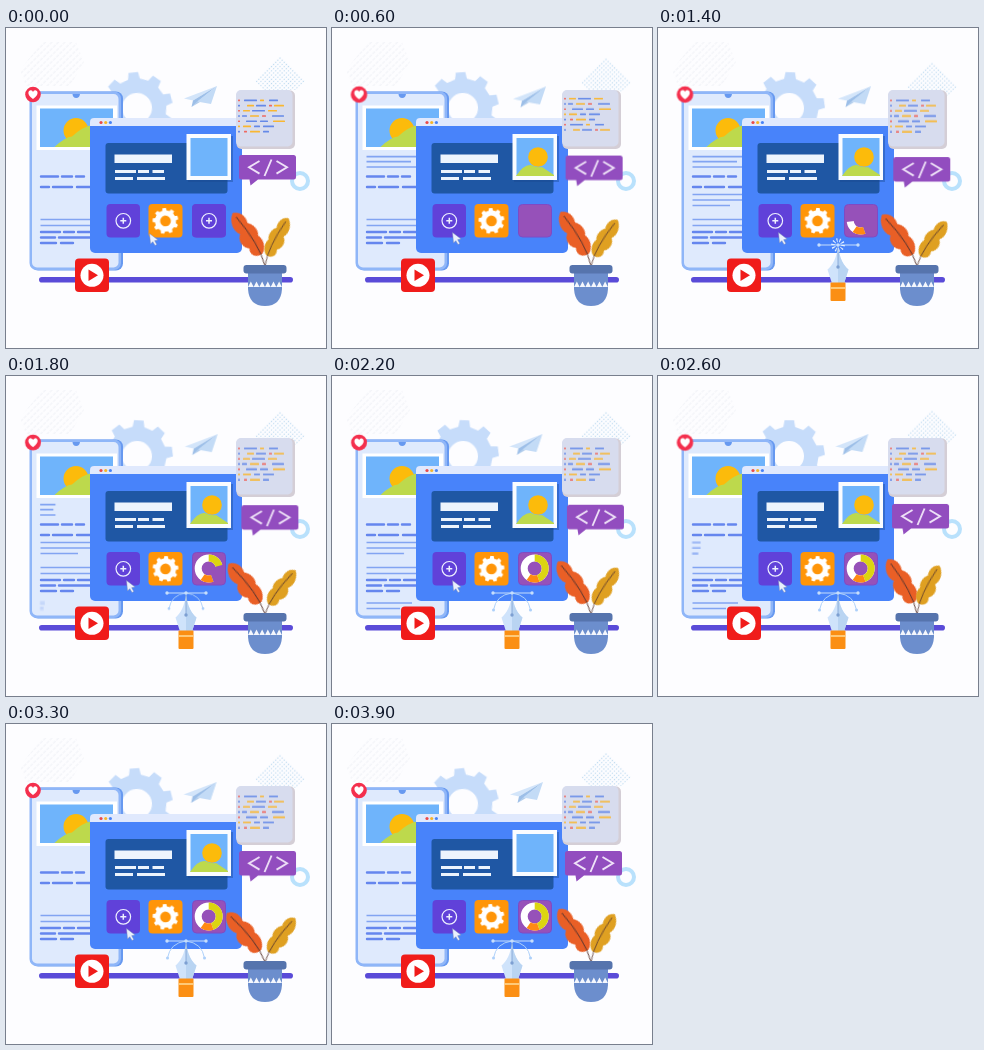
An HTML page that plays this animation: 320x320 px, repeating every 4 s.

```html
<!DOCTYPE html>
<html lang="en">
<head>
<meta charset="utf-8">
<title>App design</title>
<style>
html, body { margin: 0; width: 100%; height: 100%; overflow: hidden; background: #fdfdff; }
svg { display: block; width: 100vw; height: 100vh; }
.a { animation: 4s linear infinite; }
.ease { animation-timing-function: ease-in-out; }

.rock { animation-name: rock; }
@keyframes rock { 0%, 100% { transform: rotate(-6deg); } 45% { transform: rotate(3deg); } }
.dots { animation-name: dots; }
@keyframes dots { 50% { transform: translateY(7px); } }
.bubble { animation-name: bubble; }
@keyframes bubble { 42% { transform: translate(2.4px, 2.2px); } 85%, 100% { transform: none; } }
.plane { animation-name: plane; }
@keyframes plane { 15% { transform: translate(3px, .4px); } 35% { transform: translate(2px, .2px); } 55%, 70% { transform: translate(-.6px, 0); } }
.heart { transform-origin: 27px 66.5px; animation-name: beat; }
@keyframes beat { 12%, 37%, 62% { transform: scale(1.06); } 25%, 50%, 75% { transform: none; } }

.leafL { animation-name: leafL; }
@keyframes leafL {
  0%, 100% { transform: rotate(-29.5deg); }
  15% { transform: rotate(-27.5deg); }
  45% { transform: rotate(-34deg); }
  66% { transform: rotate(-26.5deg); }
  82% { transform: rotate(-36deg); }
}
.leafR { animation-name: leafR; }
@keyframes leafR {
  0%, 100% { transform: rotate(24deg); }
  15% { transform: rotate(28deg); }
  45% { transform: rotate(33deg); }
  66% { transform: rotate(23deg); }
  82% { transform: rotate(32.5deg); }
}

.ln { transform-origin: 34px 0; }
.ln1 { animation-name: ln1; }
@keyframes ln1 { 0%, 4% { transform: scaleX(0); } 13%, 38% { transform: none; } 48%, 100% { transform: scaleX(0); } }
.ln2 { animation-name: ln2; }
@keyframes ln2 { 0%, 20% { transform: scaleX(0); } 33%, 55% { transform: none; } 67%, 100% { transform: scaleX(0); } }
.ln3 { animation-name: ln3; }
@keyframes ln3 { 0%, 44% { transform: scaleX(0); } 54%, 68% { transform: none; } 78%, 100% { transform: scaleX(0); } }
.code { animation-name: code; }
@keyframes code { 0%, 5% { transform: none; } 30%, 100% { transform: translateY(-36.4px); } }

.hill { animation-name: hill; }
@keyframes hill { 0%, 3% { transform: translateY(42px); } 13%, 86% { transform: none; } 95%, 100% { transform: translateY(42px); } }
.cursor { animation-name: cursor; }
@keyframes cursor { 0% { transform: translate(23px, 1px); } 12%, 100% { transform: none; } }
.plus { animation-name: plus; }
@keyframes plus { 0%, 3% { opacity: 1; } 11%, 100% { opacity: 0; } }
.donut { animation-name: donut; }
@keyframes donut { 0%, 29% { stroke-dashoffset: 100; } 35% { stroke-dashoffset: 71; } 50%, 100% { stroke-dashoffset: 0; } }
.pen { transform-origin: 180px 273px; animation-name: pen; }
@keyframes pen { 0%, 18% { transform: scale(0); } 30%, 100% { transform: none; } }
.tip { transform-origin: 180px 217px; }
.spark { animation-name: spark; }
@keyframes spark { 0%, 30% { transform: scale(0); opacity: 1; } 35% { transform: none; opacity: 1; } 43%, 100% { transform: scale(1.2); opacity: 0; } }
.bar { animation-name: bar; }
@keyframes bar { 0%, 29% { transform: scale(0); } 35%, 100% { transform: none; } }
.arc { animation-name: arc; }
@keyframes arc { 0%, 37% { transform: scale(0); } 47%, 100% { transform: none; } }
</style>
</head>
<body>
<svg viewBox="0 0 320 320" xmlns="http://www.w3.org/2000/svg">
<defs>
  <pattern id="grid" width="3" height="3" patternUnits="userSpaceOnUse" patternTransform="translate(274 28) rotate(45)"><circle cx="1.5" cy="1.5" r=".7" fill="#b9d8ef"/></pattern>
  <pattern id="hatch" width="4.6" height="4.6" patternUnits="userSpaceOnUse" patternTransform="rotate(45)"><path d="M1 0V3.4" stroke="#f0f1f6" stroke-width="1"/></pattern>
  <path id="gear" fill="currentColor" fill-rule="evenodd"/>
  <g id="plus" fill="none" stroke="#eef0ff" stroke-width="1.2">
    <circle r="7.3"/><path d="M-3 0H3M0-3V3" stroke-width="1.5"/>
  </g>
  <g id="leaf">
    <path d="M4 -12C-4 -11 -8 -17 -5 -23C-11 -27 -11 -36 -6 -40C-11 -46 -9 -57 -2 -62C5 -60 8 -53 6 -46C11 -42 12 -34 9 -30C12 -24 10 -16 4 -12Z" fill="currentColor"/>
    <path d="M0 0Q6 -22 -1 -57" fill="none" stroke="#59362f" stroke-width=".9"/>
  </g>
  <clipPath id="phoneClip"><path d="M34 80.500H107V119H34Z"/></clipPath>
  <clipPath id="photoClip"><path d="M184.500 110H221.500V148H184.500Z"/></clipPath>
  <clipPath id="codeClip"><path d="M230 69.500H286V105.500H230Z"/></clipPath>
  <mask id="sweep" maskUnits="userSpaceOnUse" x="186" y="176" width="34" height="34">
    <circle class="a donut" cx="202.700" cy="192.500" r="10.500" fill="none" stroke="#fff" stroke-width="8.500" pathLength="100" stroke-dasharray="100 101" transform="rotate(70 202.700 192.500)"/>
  </mask>
</defs>

<rect width="320" height="320" fill="#fdfdff"/>
<path d="M14 42L36 14H70L78 34L64 58H20Z" fill="url(#hatch)"/>
<g class="a ease dots"><path d="M274 28L299 53L290 62H258L249 53Z" fill="url(#grid)"/></g>
<g transform="translate(131 80)"><use class="a ease rock" href="#gear" color="#c6dcfa"/></g>
<g class="a ease plane">
  <path d="M211 58L178 70.500L187 72.500Z" fill="#d3e5fa"/>
  <path d="M211 58L187 72.500L185.500 79Z" fill="#9dbfe8"/>
  <path d="M211 58L191 73.500L205 76Z" fill="#c3dbf6"/>
  <path d="M185.500 79L191 73.500L194 74Z" fill="#b2cdec"/>
</g>

<rect x="33" y="249" width="254" height="5.600" rx="2.800" fill="#5a4bd8"/>

<!-- phone -->
<rect x="25" y="63.500" width="92" height="179" rx="7" fill="#6799f0"/>
<rect x="23.500" y="63.500" width="91.500" height="178.500" rx="7" fill="#8fb6f8"/>
<rect x="26" y="66" width="86.500" height="173.500" rx="5" fill="#dfeafd"/>
<path d="M66.500 66H74Q73.500 70 70.200 70T66.500 66Z" fill="#6799f0"/>
<path d="M30.500 77.500H111V122H30.500Z" fill="#fff"/>
<g clip-path="url(#phoneClip)">
  <path d="M34 80H107V119H34Z" fill="#6fb4fb"/>
  <circle cx="70" cy="102.500" r="12.500" fill="#fcbb0b"/>
  <path d="M48 119.500Q59 109 66 108.500Q76 99 86 97L107 110V120Z" fill="#bdd94c"/>
</g>
<g fill="none" stroke="#82a4f2" stroke-width="1.700">
  <path class="a ln ln1" d="M34.500 128.600H86M34.500 133.600H79M34.500 139H86"/>
  <path class="a ln ln2" d="M34.500 166.500H86M34.500 172H86M34.500 177.500H72"/>
  <path d="M34.500 191.500H86M34.500 197.500H86"/>
  <path class="a ln ln3" d="M34.500 227H80M34.500 232.500H68"/>
</g>
<g fill="none" stroke="#6586ee" stroke-width="2.400" stroke-linecap="round">
  <path d="M35 148.500H52M56 148.500H66M70 148.500H78M35 159H43M47 159H66M71 159H86"/>
  <path d="M35 204H54M58 204H68M72 204H86M35 209.500H49M53 209.500H86M35 215H50M55 215H67"/>
</g>
<g class="a ease heart">
  <circle cx="27" cy="66.500" r="7.800" fill="#f42f4d"/>
  <path d="M27 71C20 66.500 22.500 62 25 62.300Q26.500 62.500 27 64Q27.500 62.500 29 62.300C31.500 62 34 66.500 27 71Z" fill="#fff"/>
</g>

<!-- window -->
<rect x="84" y="90" width="152" height="135" rx="5" fill="#4883fa"/>
<path d="M84 98V94Q84 90 88 90H232Q236 90 236 94V98Z" fill="#e0e9fd"/>
<circle cx="95" cy="94.500" r="1.600" fill="#ea4a4a"/>
<circle cx="99.700" cy="94.500" r="1.600" fill="#f6b52a"/>
<circle cx="104.400" cy="94.500" r="1.600" fill="#4883f6"/>
<rect x="99.500" y="115" width="122" height="50.500" rx="3" fill="#1f57a4"/>
<path d="M108.500 126.500H166V135H108.500Z" fill="#edf4fd"/>
<path d="M109 143.500H130M132 143.500H143M146.500 143.500H158M109 150.500H127M131 150.500H159" stroke="#edf4fd" stroke-width="2.800"/>
<path d="M182 108H227V154H182Z" fill="#17468c" opacity=".4"/>
<path d="M180.500 106H225V152H180.500Z" fill="#fafcff"/>
<path d="M184.500 110H221.500V148H184.500Z" fill="#6fb4fb"/>
<g clip-path="url(#photoClip)"><g class="a ease hill">
  <circle cx="206" cy="129" r="9.800" fill="#fcbb0b"/>
  <path d="M184 150V148Q192 136 199 137Q205 140 210 139L222 147V150Z" fill="#bdd94c"/>
</g></g>

<!-- buttons -->
<rect x="100.500" y="176" width="33.500" height="33.500" rx="4" fill="#6041d9"/>
<use href="#plus" x="117.300" y="192.800"/>
<rect x="142.500" y="176" width="34" height="33.500" rx="4" fill="#ff9508"/>
<g transform="translate(159.500 193) scale(.36)"><use class="a ease rock" href="#gear" color="#fff"/></g>
<rect x="186.500" y="176.500" width="33" height="32.500" rx="4" fill="#9651b9" stroke="#7f4ac4"/>
<g class="a plus">
  <rect x="186" y="176" width="34" height="33.500" rx="4" fill="#6041d9"/>
  <use href="#plus" x="203" y="192.800"/>
</g>
<g mask="url(#sweep)" transform="translate(0 0)" fill="none" stroke-width="7">
  <circle cx="202.700" cy="192.500" r="10.500" stroke="#fff"/>
  <circle id="yellow" cx="202.700" cy="192.500" r="10.500" stroke="#dcd511" pathLength="360" stroke-dasharray="160 200" transform="rotate(-90 202.700 192.500)"/>
  <circle cx="202.700" cy="192.500" r="10.500" stroke="#ff8a12" pathLength="360" stroke-dasharray="55 305" transform="rotate(70 202.700 192.500)"/>
</g>
<path class="a ease cursor" d="M120.500 204.500L121.500 215L123.800 212.700L126 216.500L127.800 215.500L125.700 211.700L129 211Z" fill="#e9f0fd" stroke="#7787b8" stroke-width=".5"/>

<!-- pen tool -->
<g class="a ease pen">
  <path d="M180 217.500C181 230 186 238 190.500 241.500L186 255.500H174L169.500 241.500C174 238 179 230 180 217.500Z" fill="#cfe3fb"/>
  <path d="M180 217.500C181 230 186 238 190.500 241.500L186 255.500H180Z" fill="#b9d4f2"/>
  <path d="M180 219V238" stroke="#7d9fd2" stroke-width=".8"/>
  <circle cx="180" cy="239" r="1.700" fill="#7d9fd2"/>
  <rect x="172.500" y="254.500" width="15" height="18.500" rx="1" fill="#fb8f14"/>
  <path d="M172.500 260H187.500" stroke="#ffd084" stroke-width="1.800"/>
</g>
<g fill="none" stroke="#add0fa" stroke-width="1">
  <g class="a ease tip arc">
    <path d="M180 217Q164 219 161.500 234M180 217Q196 219 198.500 234"/>
    <path d="M161.500 234h.01M198.500 234h.01" stroke-width="3" stroke-linecap="round"/>
  </g>
  <g class="a ease tip bar" stroke="#c6defc">
    <path d="M161 217H200"/>
    <path d="M161 217h.01M180 217h.01M200 217h.01" stroke-width="3.400" stroke-linecap="round"/>
  </g>
  <circle class="a tip spark" cx="180" cy="217" r="4.800" stroke="#e6f1ff" stroke-width="4" pathLength="20" stroke-dasharray=".7 1.300"/>
</g>

<!-- code card and tag -->
<rect x="230.500" y="62.500" width="58.500" height="58.500" rx="5" fill="#d4ced6"/>
<rect x="230" y="62" width="56.500" height="56.500" rx="5" fill="#d7dcee"/>
<g clip-path="url(#codeClip)"><g class="a ease code" id="code"></g></g>
<circle cx="294" cy="153" r="8" fill="none" stroke="#b9e1fc" stroke-width="4"/>
<g class="a ease bubble">
  <path d="M235 127H287.500Q290 127 290 129.500V149Q290 151.500 287.500 151.500H252L244.500 157.500L243.500 151.500H235.500Q233 151.500 233 149V129.500Q233 127 235.500 127Z" fill="#924dbf"/>
  <path d="M253.500 133L243 139.300L253.500 145.600M270.500 133L281 139.300L270.500 145.600M265.500 131.500L258.500 148" fill="none" stroke="#efe2f8" stroke-width="1.900"/>
</g>

<!-- plant -->
<g transform="translate(259 238)">
  <g class="a ease leafL"><use href="#leaf" color="#e95f26"/></g>
  <g class="a ease leafR"><use href="#leaf" transform="scale(-.84 .86)" color="#dfa022"/></g>
</g>
<path d="M242 245H276V261Q275 278 259 278T242 261Z" fill="#6c8ecd"/>
<rect x="237.500" y="237" width="43" height="8.500" rx="3" fill="#5674ad"/>
<path d="M242 259l2.830 -5.500l2.830 5.500l2.830 -5.500l2.830 5.500l2.830 -5.500l2.830 5.500l2.830 -5.500l2.830 5.500l2.830 -5.500l2.830 5.500l2.830 -5.500l2.830 5.500Z" fill="#f4f7fd"/>

<!-- play tile -->
<rect x="69" y="230.500" width="34" height="33.500" rx="4" fill="#f01c1a"/>
<circle cx="86" cy="247.300" r="11.500" fill="#fff"/>
<path d="M82.500 241.500V253L92 247.300Z" fill="#f01c1a"/>
</svg>
<script>
// Cog outline with tapered teeth and a round hole.
function gearPath(teeth, outer, inner, hole) {
  const step = 2 * Math.PI / teeth;
  const corners = [[-.29, inner], [-.19, outer], [.19, outer], [.29, inner]];
  const points = Array.from({ length: teeth }, (_, i) => corners.map(([part, r]) => {
    const angle = (i + part) * step;
    return `${(r * Math.sin(angle)).toFixed(2)} ${(-r * Math.cos(angle)).toFixed(2)}`;
  })).flat();
  return `M${points.join('L')}ZM${hole} 0A${hole} ${hole} 0 1 0 ${-hole} 0A${hole} ${hole} 0 1 0 ${hole} 0Z`;
}
document.getElementById('gear').setAttribute('d', gearPath(9, 36, 29.5, 15));

// Each dash: colour key, start and length.
const inks = { r: '#ee6a62', o: '#f9b732', b: '#6589e8' };
const rows = [
  'r2,2 b8,13 o24,4 b33,9',
  'b2,2 o11,7 b20,10 r33,3 o38,10',
  'r2,2 o7,7 b16,13 o32,9',
  'b2,2 b6,5 o14,9 r26,4 b36,12',
  'r2,2 b10,11 b24,8 o37,12',
  'o2,2 o7,8 b18,6 b27,11',
  'b2,2 r8,3 o14,10 b27,6'
];
const pitch = 5.2;
const dash = (key, y) => {
  const [x, w] = key.slice(1).split(',').map(Number);
  return `<rect x="${230 + x}" y="${y}" width="${w}" height="1.6" rx=".5" fill="${inks[key[0]]}"/>`;
};
document.getElementById('code').innerHTML = [...rows, ...rows]
  .map((row, i) => row.split(' ').map(key => dash(key, 71.6 + i * pitch)).join(''))
  .join('');
</script>
</body>
</html>
```
